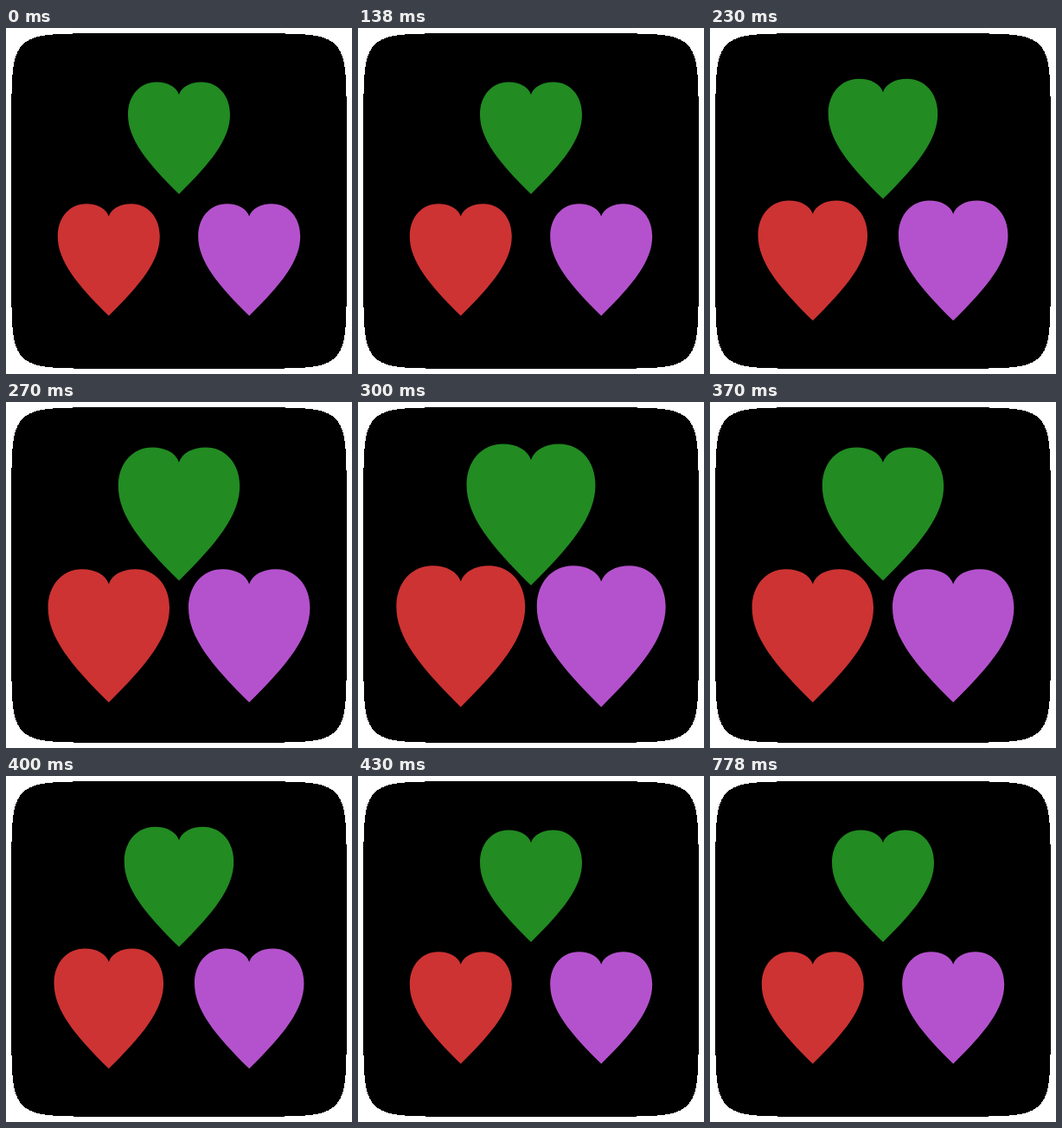
Recreate the animation shown at these times as an HTML page. Size 400x400 px, loop 1.01 s.

```html
<!DOCTYPE html>
<html lang="en">
<head>
<meta charset="utf-8">
<title>Beating hearts</title>
<style>
  html, body { margin: 0; width: 100%; height: 100%; overflow: hidden; background: #fff; }
  svg { display: block; width: 100%; height: 100%; }
</style>
</head>
<body>
<svg viewBox="0 0 400 400">
  <defs>
    <path id="heart" d="M0 76C-37 39.5-59 12.5-59-16C-59-38-45-53.5-26-53.5C-13-53.5-3-48 0-39C3-48 13-53.5 26-53.5C45-53.5 59-38 59-16C59 12.5 37 39.5 0 76Z"/>
  </defs>
  <path id="tile" shape-rendering="crispEdges"/>
  <use class="beat" href="#heart" data-x="200" data-y="116.1" fill="#228b22"/>
  <use class="beat" href="#heart" data-x="118.8" data-y="256.8" fill="#cd3333"/>
  <use class="beat" href="#heart" data-x="281.2" data-y="256.8" fill="#b452cd"/>
</svg>
<script>
const LOOP = 1010;
// [start in ms, scale], each held until the next
const BEAT = [[0, 1], [230, 1.072], [270, 1.19], [300, 1.262], [370, 1.19], [400, 1.072], [430, 1]];
const hearts = [...document.querySelectorAll('.beat')];

function superellipse(c, r, n) {
  const axis = v => (c + r * Math.sign(v) * Math.abs(v) ** (2 / n)).toFixed(2);
  const points = [];
  for (let i = 0; i < 720; i++) {
    const a = i * Math.PI / 360;
    points.push(axis(Math.cos(a)) + ' ' + axis(Math.sin(a)));
  }
  return 'M' + points.join('L') + 'Z';
}

function draw(ms) {
  const t = ms % LOOP;
  const scale = BEAT.findLast(([start]) => start <= t)[1];
  for (const h of hearts) {
    h.setAttribute('transform', `translate(${h.dataset.x} ${h.dataset.y}) scale(${scale})`);
  }
}

document.getElementById('tile').setAttribute('d', superellipse(200, 193.7, 10));

const begin = performance.now();
function tick() {
  draw(performance.now() - begin);
  requestAnimationFrame(tick);
}
tick();
</script>
</body>
</html>
```
